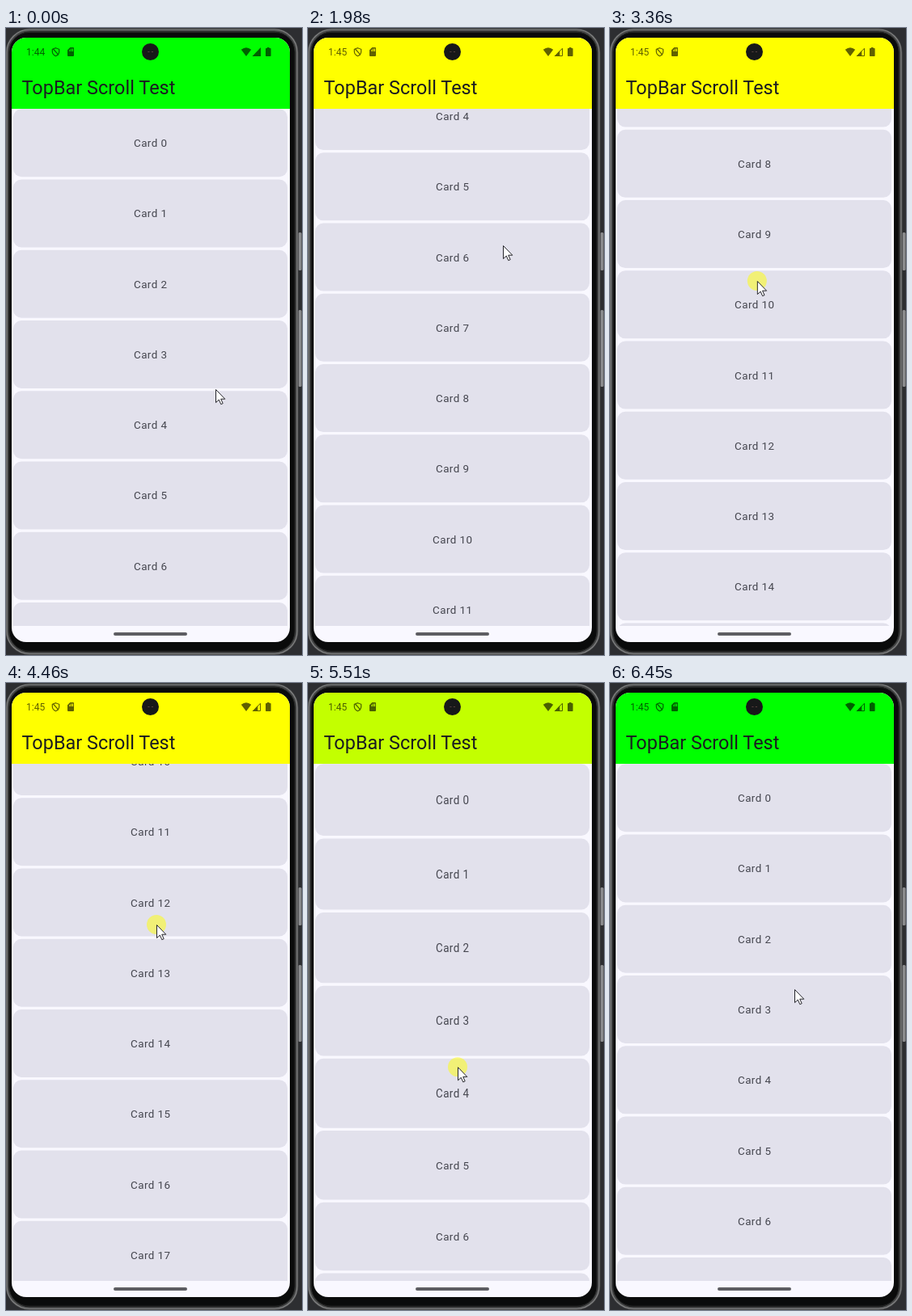
Recreate the animation shown at these times as an HTML page. Size 366 by 776 pixels, loop 6650 ms.

```html
<!DOCTYPE html>
<html lang="en">
<head>
<meta charset="utf-8">
<title>Top bar scroll</title>
<style>
  html, body { margin: 0; width: 100%; height: 100%; overflow: hidden; background: #2d2e31; }
  #stage { position: relative; width: 366px; height: 776px; overflow: hidden; font-family: Roboto, sans-serif; }
  #stage > svg { position: absolute; left: 0; top: 0; }
  #screen { position: absolute; left: 7px; top: 12px; width: 344px; height: 748px; border-radius: 18px; overflow: hidden; background: #f9f8ff; }
  #list { position: absolute; left: 0; top: 88px; width: 344px; height: 640px; overflow: hidden; }
  .card {
    position: absolute; left: 2px; top: 0; width: 339.4px; height: 84px; border-radius: 10px;
    background: #e2e1ec; color: #45464f; font-size: 13.4px; letter-spacing: .42px;
    display: flex; align-items: center; justify-content: center; transform-origin: 0 0;
  }
  #bar { position: absolute; left: 0; top: 0; width: 344px; height: 88px; background: #0f0; }
  #title { position: absolute; left: 12.5px; top: 48px; font-size: 23.4px; line-height: 28px; letter-spacing: .04px; color: #1a1b21; white-space: nowrap; }
  #clock { position: absolute; left: 18px; top: 10px; font-size: 12px; line-height: 16px; color: rgba(0, 0, 0, .62); }
  #pill { position: absolute; left: 126px; top: 736px; width: 91px; height: 4px; border-radius: 2px; background: #5d5d62; }
</style>
</head>
<body>
<div id="stage">
  <svg width="366" height="776">
    <rect width="366" height="776" fill="#2d2e31"/>
    <g fill="#8b8c8e">
      <rect x="361.5" y="253" width="4" height="47" rx="1.5"/>
      <rect x="361.5" y="349" width="4" height="95" rx="1.5"/>
    </g>
    <g fill="none">
      <rect x="1.5" y="2.5" width="358" height="771.5" rx="28" fill="#0a0b0b" stroke="#454646" stroke-width="4"/>
      <rect x="1" y="2" width="359" height="772.5" rx="28" stroke="#828384" stroke-width="1.2"/>
      <rect x="4" y="5.5" width="353" height="765.5" rx="24" stroke="#222323"/>
    </g>
  </svg>
  <div id="screen">
    <div id="list"></div>
    <div id="bar"></div>
    <div id="clock">1:44</div>
    <div id="title">TopBar Scroll Test</div>
    <div id="pill"></div>
  </div>
  <svg width="366" height="776">
    <g fill="#000" opacity=".62">
      <path d="M61.5 24.7 L65.7 26.3 V29.5 Q65.5 33 61.5 34.7 Q57.5 33 57.3 29.5 V26.3 Z M58 25.5 L65 33.3" fill="none" stroke="#000" stroke-width="1.2"/>
      <path fill-rule="evenodd" d="M79.3 24 H83 Q84 24 84 25 V34 Q84 35 83 35 H77 Q76 35 76 34 V27.3 Z M78.3 26.8 V29 H79.3 V26.8 Z M80.2 25.6 V29 H81.2 V25.6 Z M82 25.6 V29 H83 V25.6 Z"/>
      <path d="M290.8 26.8 Q297 21.6 303.2 26.8 L297 35 Z"/>
      <path id="full" d="M315 24 V35 H304.5 Z"/>
      <g id="weak">
        <path d="M314.5 25.2 V34.5 H305.6 Z" fill="none" stroke="#000"/>
        <path d="M311.3 28 V35 H304.5 Z"/>
      </g>
      <path d="M322.8 24 H325.6 V25 H327 Q327.6 25 327.6 25.7 V34.3 Q327.6 35 327 35 H321.6 Q321 35 321 34.3 V25.7 Q321 25 321.6 25 H322.8 Z"/>
    </g>
    <circle cx="178.5" cy="29.5" r="10.5" fill="#171819"/>
    <path d="M175.3 29.5 H177.5 M179.8 29.5 H182" stroke="#553f3d"/>
    <g id="pointer">
      <circle id="press" r="12" fill="#ff0" opacity=".5"/>
      <path d="M.5 .5 V16.6 L4.3 13.1 L6.8 18.7 L9.2 17.6 L6.7 12.2 H11.8 Z" fill="#fff" stroke="#25252b" stroke-linejoin="round"/>
    </g>
  </svg>
</div>
<script>
const LOOP = 6650, LEAD = 120, STEP = 68.8, LAST = 92;
const PITCH = 87.25, CARD = 84, VIEW = 640, CARDS = 20;
const $ = id => document.getElementById(id);

// Each swipe drags the list with the pointer, then flings it further. Times are in steps.
const swipes = [
  { down: 9,  up: 12, from: [256, 452.5], to: [253, 296], fling: 55 },
  { down: 22, up: 27, from: [247, 440],   to: [241, 269], fling: 125 },
  { down: 42, up: 48, from: [186, 478],   to: [181, 280], fling: 60.6 },
  { down: 56, up: 61, from: [188, 451],   to: [187, 299], fling: 0 },
  { down: 63, up: 67, from: [186, 299],   to: [186, 491], fling: -600 },
  { down: 74, up: 79, from: [185, 280],   to: [185, 524], fling: 0 }
];
const release = swipes[swipes.length - 1].up;
const stops = [{ up: 0, to: [259, 447] }, ...swipes, { down: 91, up: LAST, from: [228, 379], to: [228, 379] }];

const clamp = v => Math.min(1, Math.max(0, v));
const progress = (s, a, b) => clamp((s - a) / (b - a));
const smooth = p => p * p * (3 - 2 * p);
const mix = (a, b, p) => a.map((v, i) => v + (b[i] - v) * p);

// Critically damped spring
function spring(steps, speed) {
  const x = Math.max(0, steps) * STEP / 1000 * speed;
  return 1 - (1 + x) * Math.exp(-x);
}

function travel(s) {
  return swipes.reduce((sum, { down, up, from, to, fling }) =>
    sum + (from[1] - to[1]) * progress(s, down, up)
        + fling * (1 - Math.exp(-Math.max(0, s - up) / 3)), 0);
}

function pointerAt(s) {
  const i = Math.max(1, stops.findIndex(stop => s <= stop.up));
  const { down, up, from, to } = stops[i], last = stops[i - 1];
  return s < down
    ? mix(last.to, from, smooth(progress(s, last.up, down)))
    : mix(from, to, progress(s, down, up));
}

const cards = Array.from({ length: CARDS }, (_, i) => {
  const card = document.createElement('div');
  card.className = 'card';
  card.textContent = 'Card ' + i;
  $('list').append(card);
  return card;
});

function draw(s) {
  const offset = travel(s), scroll = Math.max(0, offset);
  const pull = Math.max(0, -offset) * .365 * (1 - spring(s - release, 9));
  const bend = y => {
    const v = clamp(y / VIEW);
    return y + pull * v * (2 - v);
  };
  cards.forEach((card, i) => {
    const y = .2 + i * PITCH - scroll, top = bend(y);
    card.style.transform = `translateY(${top}px) scaleY(${(bend(y + CARD) - top) / CARD})`;
  });

  const yellow = spring(s - 10.34, 20) - spring(s - 77.02, 20);
  $('bar').style.background = `color-mix(in oklab, #ff0 ${yellow * 100}%, #0f0)`;
  $('clock').textContent = s < 4 ? '1:44' : '1:45';
  $('full').style.display = s < 24 ? '' : 'none';
  $('weak').style.display = s < 24 ? 'none' : '';

  $('pointer').setAttribute('transform', `translate(${pointerAt(s)})`);
  $('press').style.display = swipes.some(w => s >= w.down && s < w.up) ? '' : 'none';
}

const start = performance.now();
function tick() {
  const t = (performance.now() - start) % LOOP;
  draw(Math.max(0, Math.min(LAST, Math.floor((t - LEAD) / STEP + .15))));
  requestAnimationFrame(tick);
}
tick();
</script>
</body>
</html>
```
